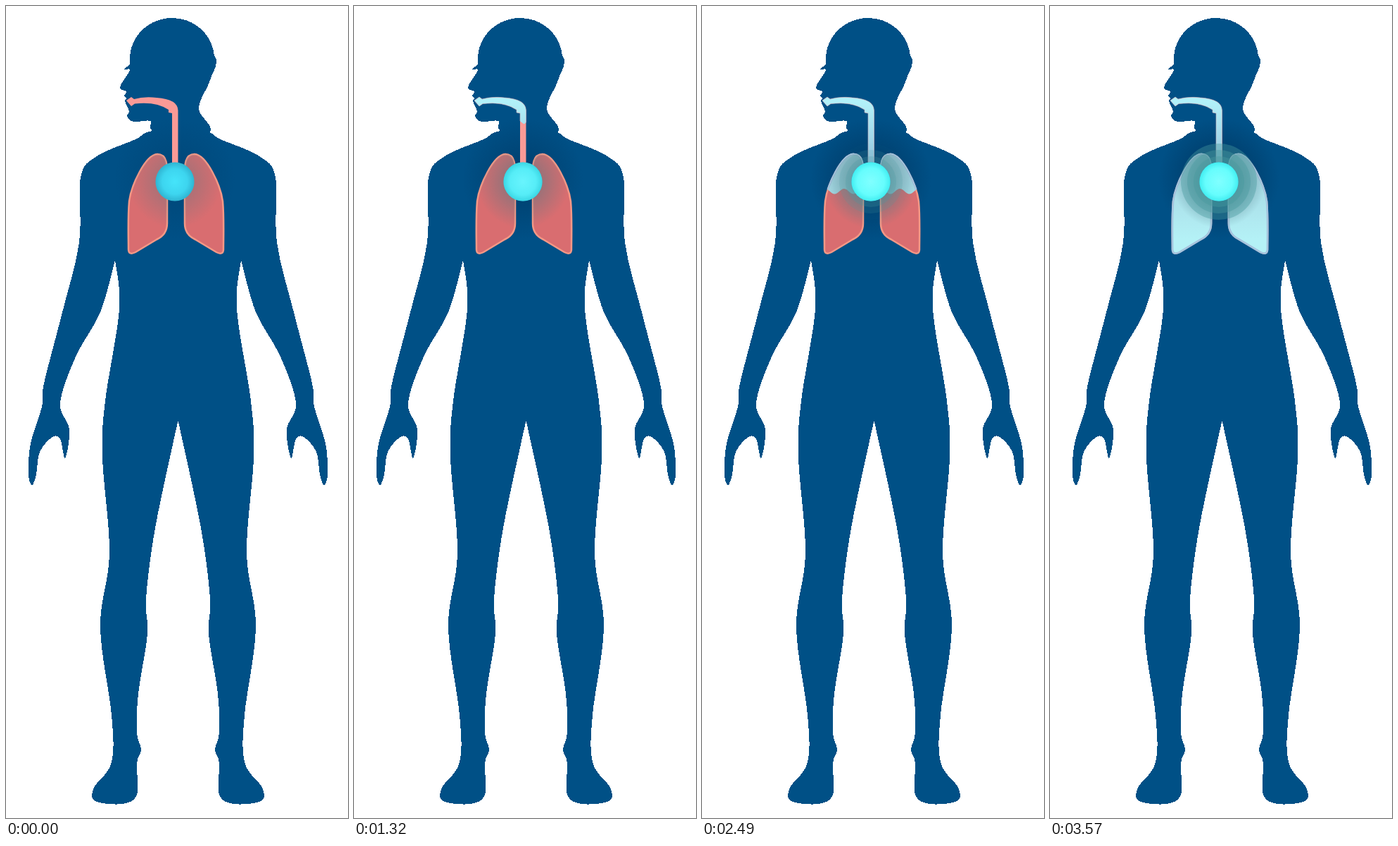
Write an HTML page that moves like this. It is 486 px wide and 1151 px high and loops after 3600 ms.

```html
<!DOCTYPE html>
<html lang="en">
<head>
<meta charset="utf-8">
<title>Breathing</title>
<style>
  html, body { margin: 0; height: 100%; overflow: hidden; background: #fff; }
  svg { display: block; width: 100vw; height: 100vh; }
</style>
</head>
<body>
<svg viewBox="0 0 486 1151">
  <defs>
    <path id="half"/>
    <path id="face"/>
    <ellipse id="skull" cx="236" cy="75" rx="60" ry="58"/>
    <path id="lung" d="M215,210C198,211 178,254 175,277C173,300 174,328 174,345C174,351 178,352 184,349L214,331C225,326 229,318 229,308V250C229,230 231,210 215,210Z"/>
    <g id="lungs"><use href="#lung"/><use href="#lung" transform="translate(483) scale(-1,1)"/></g>
    <path id="airway" d="M171,134L178,129L182,132Q196,128 214,130Q244,132 244.500,148V226H236V152L231,151V147Q213,135 183,138.500L178,142Z"/>
    <clipPath id="bodyClip">
      <use href="#half"/><use href="#half" transform="translate(489) scale(-1,1)"/><use href="#face"/>
    </clipPath>
    <clipPath id="lungClip"><use href="#lung"/><use href="#lung" transform="translate(483) scale(-1,1)"/></clipPath>
    <clipPath id="levelClip"><path id="level"/></clipPath>
    <clipPath id="pipeClip"><path id="pipe"/></clipPath>
    <clipPath id="frontClip"><path id="front"/></clipPath>
    <radialGradient id="dark">
      <stop offset=".35" stop-color="#003a66"/>
      <stop offset="1" stop-color="#003a66" stop-opacity="0"/>
    </radialGradient>
    <radialGradient id="halo">
      <stop offset=".4" stop-color="#4b7782" stop-opacity=".6"/>
      <stop offset="1" stop-color="#4b7782" stop-opacity="0"/>
    </radialGradient>
    <linearGradient id="air" gradientUnits="userSpaceOnUse" x1="0" y1="205" x2="0" y2="330">
      <stop offset="0" stop-color="#a0cddb"/>
      <stop offset="1" stop-color="#b4f1f6"/>
    </linearGradient>
    <linearGradient id="pipeAir" gradientUnits="userSpaceOnUse" x1="0" y1="135" x2="0" y2="225">
      <stop offset="0" stop-color="#b2f1f9"/>
      <stop offset="1" stop-color="#98c4de"/>
    </linearGradient>
    <radialGradient id="calm">
      <stop offset="0" stop-color="#45e4fa"/>
      <stop offset=".65" stop-color="#3dd5ef"/>
      <stop offset="1" stop-color="#2fb5d2"/>
    </radialGradient>
    <radialGradient id="bright">
      <stop offset="0" stop-color="#80ffff"/>
      <stop offset=".7" stop-color="#66fdfd"/>
      <stop offset="1" stop-color="#42eef1"/>
    </radialGradient>
  </defs>

  <g fill="#005086" shape-rendering="crispEdges">
    <use href="#half"/><use href="#half" transform="translate(489) scale(-1,1)"/>
    <use href="#face"/><use href="#skull"/>
  </g>
  <g clip-path="url(#bodyClip)"><circle id="shade" cx="240" cy="245" r="86" fill="url(#dark)"/></g>
  <use href="#airway" fill="#fa9a96"/>
  <use href="#lungs" fill="#d96d70" stroke="#f59886" stroke-width="2.500"/>
  <g clip-path="url(#frontClip)"><g clip-path="url(#pipeClip)">
    <use href="#airway" fill="url(#pipeAir)" stroke="#c9a9b8" stroke-width=".6"/>
  </g></g>
  <g clip-path="url(#levelClip)">
    <use href="#lungs" fill="url(#air)" stroke="#a6c4de" stroke-width="2.800"/>
  </g>
  <g clip-path="url(#lungClip)"><circle id="glow" cx="240" cy="249" r="66" fill="url(#halo)"/></g>
  <g id="rings" fill="#46999f"></g>
  <circle cx="240" cy="249" r="27.500" fill="url(#calm)"/>
  <circle id="shine" cx="240" cy="249" r="27.500" fill="url(#bright)"/>
</svg>
<script>
const $ = id => document.getElementById(id);
const setPath = (id, d) => $(id).setAttribute('d', d);
const LOOP = 3600, STEP = 30, HOLD = 150;
const MID = 241.5, WAVE = 27;

// Key points of one body half; a repeated point makes a corner.
const arm = `205,178 184,189 129,213 106,243 104,335 79,438 54,535 51,568 35,620 32,664 37,679 43,664
  48,632 66,611 77,614 84,641 90,600 77,562 100,495 134,434 155,360 155,360`;
const leg = `161,430 141,560 137,640 147,775 134,880 150,1005 150,1072 125,1108 127,1127 165,1131
  186,1118 186,1073 192,1054 186,1030 188,975 201,890 199,840 212,740 243,594 243,594`;
const face = `172,86 176,91 162,115 171,121 168,127 171,131 169,135 175,149 172,156 181,164 205,163 207,176
  240,200 290,178 274,145 290,105 296,70 240,40`;

// Closed smooth curve through the points.
function smooth(text) {
  const pts = text.trim().split(/\s+/).map(p => p.split(',').map(Number));
  const n = pts.length, at = i => pts[(i + n) % n];
  const ctrl = (p, from, to) => p.map((v, k) => v + (to[k] - from[k]) / 6);
  const curve = pts.map((p, i) =>
    `C${ctrl(p, at(i - 1), at(i + 1))} ${ctrl(at(i + 1), at(i + 2), p)} ${at(i + 1)}`);
  return `M${pts[0]}${curve.join('')}Z`;
}

setPath('half', smooth(`${arm} ${leg} 262,500 262,177`));
setPath('face', smooth(face));

const rings = [2, 1, 0].map(i => {
  const el = document.createElementNS('http://www.w3.org/2000/svg', 'circle');
  const place = { cx: 240, cy: 249, r: 36 + 9 * i };
  for (const key in place) el.setAttribute(key, place[key]);
  $('rings').append(el);
  return { el, start: 1500 + 475 * i };
});

const ramp = (t, a, b) => Math.min(1, Math.max(0, (t - a) / (b - a)));

// Area above the falling level, with a ripple mirrored about the middle.
function wavePath(t) {
  const end = ramp(t, 3480, 3570);
  const y = 238 + .0825 * (t - 2190) + 6 * end;
  const crest = 196 + .0195 * (t - 2190);
  const amp = 3.8 * (1 - end);
  let d = 'M320,100H160';
  for (let x = 160; x <= 320; x += 2) {
    const side = Math.min(x, 2 * MID - x);
    const v = y - amp * Math.cos((side - crest) / WAVE * 2 * Math.PI);
    d += `L${x},${Math.max(100, v).toFixed(2)}`;
  }
  return d + 'Z';
}

function draw(ms) {
  let t = ms % LOOP;
  t = t < HOLD ? 0 : t - t % STEP;
  const wave = wavePath(t);
  const f = Math.max(150, 216 + .1 * (t - 840));
  setPath('level', wave);
  setPath('pipe', wave + 'M230,100H160V165H230Z');
  setPath('front', `M140,105H${f + 25}L${f - 8},145V240H140Z`);
  const grow = ramp(t, 0, 3000);
  $('shade').setAttribute('opacity', .3 + .55 * grow);
  $('glow').setAttribute('opacity', .5 + .5 * grow);
  $('shine').setAttribute('opacity', ramp(t, 0, 2200));
  for (const { el, start } of rings) el.setAttribute('opacity', .4 * ramp(t, start, 3200));
}

const begin = performance.now();
function tick() {
  draw(performance.now() - begin);
  requestAnimationFrame(tick);
}
draw(0);
requestAnimationFrame(tick);
</script>
</body>
</html>
```
